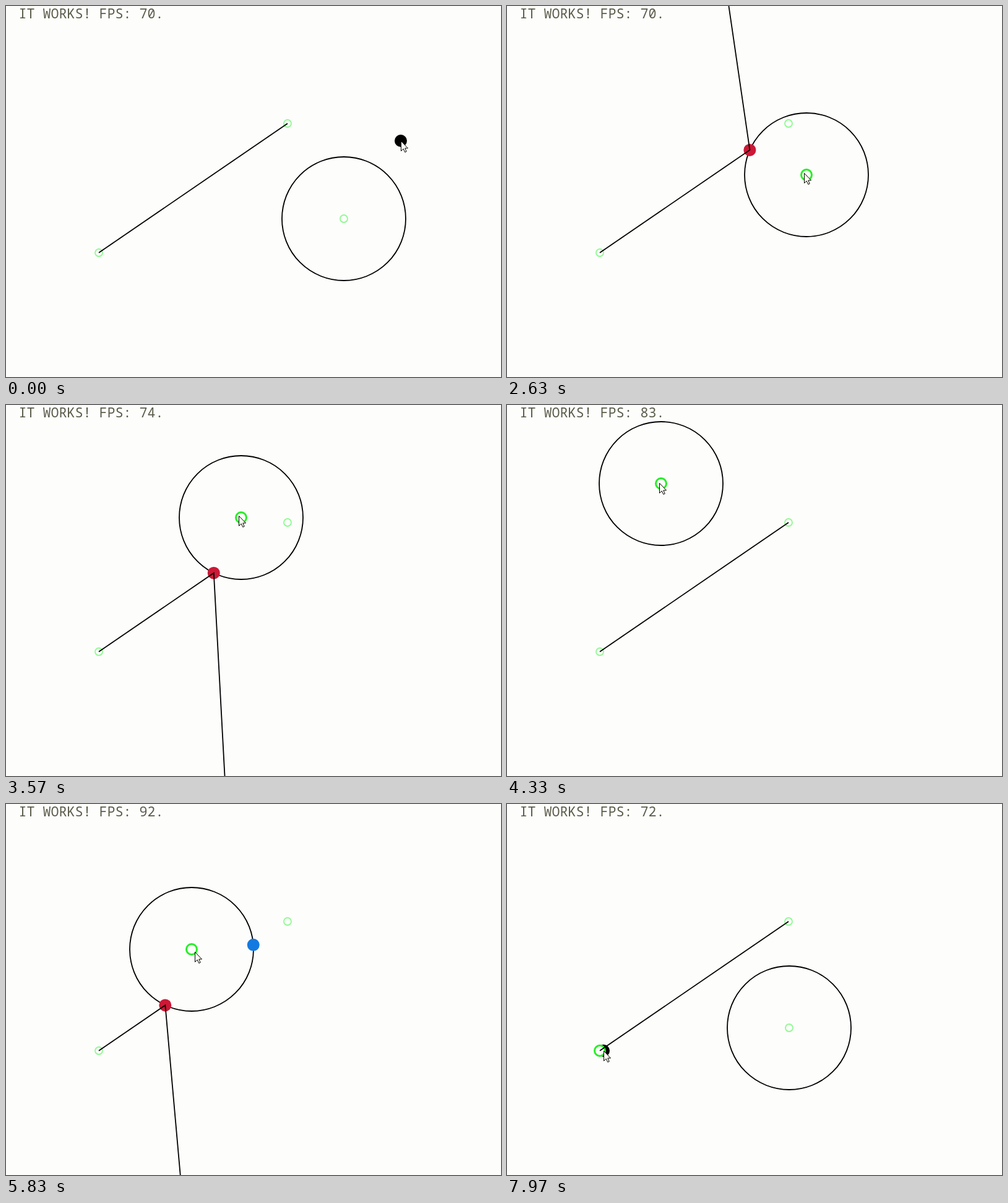
An HTML page that plays this animation: 800 px wide and 600 px high, repeating every 8 s.

```html
<!DOCTYPE html>
<html lang="en">
<head>
<meta charset="utf-8">
<title>Ray and circle</title>
<style>
  html, body { margin: 0; width: 100%; height: 100%; overflow: hidden; background: #fdfdfb; }
  svg { display: block; width: 100vw; height: 100vh; }
  text { font: 21.67px "Noto Sans Mono", monospace; fill: #5c5c4c; white-space: pre; }
  .line { fill: none; stroke: #000; stroke-width: 1.8; }
  .ring { fill: #fdfdfb; stroke: #90fa92; stroke-width: 1.8; }
  .ring.hot { stroke: #28ee28; stroke-width: 3; }
</style>
</head>
<body>
<svg viewBox="0 0 800 600">
  <text id="label" x="20.5" y="20"></text>
  <circle id="dot" r="10"/>
  <circle id="ball" class="line" r="100"/>
  <circle id="ringA" class="ring"/>
  <circle id="ringB" class="ring"/>
  <circle id="ringC" class="ring"/>
  <circle id="exit" r="10" fill="#147ae0"/>
  <circle id="hit" r="10" fill="#cc1836"/>
  <path id="ray" class="line"/>
  <path id="cursor" d="M.5 .5V16.5L4.2 13L6.8 18.5L9.2 17.4L6.8 12H11.5Z" fill="#fffff4" stroke="#000"/>
</svg>
<script>
const TICK = 1000 / 30, TICKS = 240, RADIUS = 100;
const GRAB = 52, DROP = 220;
const A = [150, 399], B = [455, 190];
const $ = id => document.getElementById(id);

// Turning points of the hand: tick, x, y. The dragged ball trails it by one tick.
const path = [
  [1, 638, 218], [16, 610, 408], [26, 596, 345], [45, 544, 340],
  [61, 548, 343], [79, 484, 273], [107, 380, 182], [126, 289, 138],
  [130, 249, 127], [151, 207, 122], [175, 300, 235], [200, 424, 340],
  [220, 456, 362], [226, 437, 367], [237, 152, 398], [240, 156, 399]
];

function slope(i, k) {
  const a = path[Math.max(i - 1, 0)], b = path[Math.min(i + 1, path.length - 1)];
  return (b[k] - a[k]) / (b[0] - a[0]);
}

// Cubic Hermite interpolation, snapped to whole pixels like a mouse.
function hand(n) {
  n = Math.min(Math.max(n, 1), TICKS);
  let i = 0;
  while (i < path.length - 2 && n > path[i + 1][0]) i++;
  const p = path[i], q = path[i + 1], h = q[0] - p[0], u = (n - p[0]) / h;
  const u2 = u * u, u3 = u2 * u;
  return [1, 2].map(k => Math.round(
    p[k] * (2 * u3 - 3 * u2 + 1) + q[k] * (3 * u2 - 2 * u3) +
    h * (slope(i, k) * (u3 - 2 * u2 + u) + slope(i + 1, k) * (u3 - u2))));
}

// Frame rate: steady with jitter, faster for a while in the middle.
function fps(n) {
  const s = Math.sin(n * 12.9898) * 43758.5453;
  const jitter = (s - Math.floor(s) - 0.5) * 5;
  return Math.round(72 + 26 * Math.exp(-(((n - 158) / 30) ** 2)) + jitter);
}

function place(id, p) {
  const el = $(id);
  el.style.display = p ? "" : "none";
  if (p) {
    el.setAttribute("cx", p[0]);
    el.setAttribute("cy", p[1]);
  }
}

function ring(id, p, hot) {
  place(id, p);
  $(id).setAttribute("r", hot ? 8.5 : 6);
  $(id).classList.toggle("hot", hot);
}

// Follow the ray from A to B, mirrored where it first meets the ball.
function trace(c) {
  const dx = B[0] - A[0], dy = B[1] - A[1], len = Math.hypot(dx, dy);
  const d = [dx / len, dy / len], rel = [c[0] - A[0], c[1] - A[1]];
  const along = rel[0] * d[0] + rel[1] * d[1];
  const off = d[0] * rel[1] - d[1] * rel[0];
  const half = Math.sqrt(RADIUS * RADIUS - off * off);
  const at = s => s >= 0 && s <= len ? [A[0] + d[0] * s, A[1] + d[1] * s] : null;
  const hit = at(along - half), exit = at(along + half);
  if (!hit) return { hit, exit, points: [A, B] };
  const n = [(hit[0] - c[0]) / RADIUS, (hit[1] - c[1]) / RADIUS];
  const dot = 2 * (d[0] * n[0] + d[1] * n[1]);
  const end = [0, 1].map(k => hit[k] + 1500 * (d[k] - dot * n[k]));
  return { hit, exit, points: [A, hit, end] };
}

function draw(n) {
  const mouse = hand(n + 1), ball = hand(Math.min(Math.max(n, GRAB), DROP));
  const drag = n >= GRAB && n < DROP;
  const near = p => !drag && Math.hypot(mouse[0] - p[0], mouse[1] - p[1]) < 10;
  const { hit, exit, points } = trace(ball);

  $("label").textContent = `IT WORKS! FPS: ${fps(n)}.`;
  place("dot", drag ? null : mouse);
  place("ball", ball);
  ring("ringA", A, near(A));
  ring("ringB", B, near(B));
  ring("ringC", ball, drag || near(ball));
  place("hit", hit);
  place("exit", exit);
  $("ray").setAttribute("d", "M" + points.map(p => p.join(" ")).join("L"));
  $("cursor").setAttribute("transform", `translate(${mouse.join(" ")})`);
}

let start;
function tick(now) {
  start ??= now;
  draw(Math.floor((now - start) / TICK + 0.15) % TICKS);
  requestAnimationFrame(tick);
}
draw(0);
requestAnimationFrame(tick);
</script>
</body>
</html>
```
